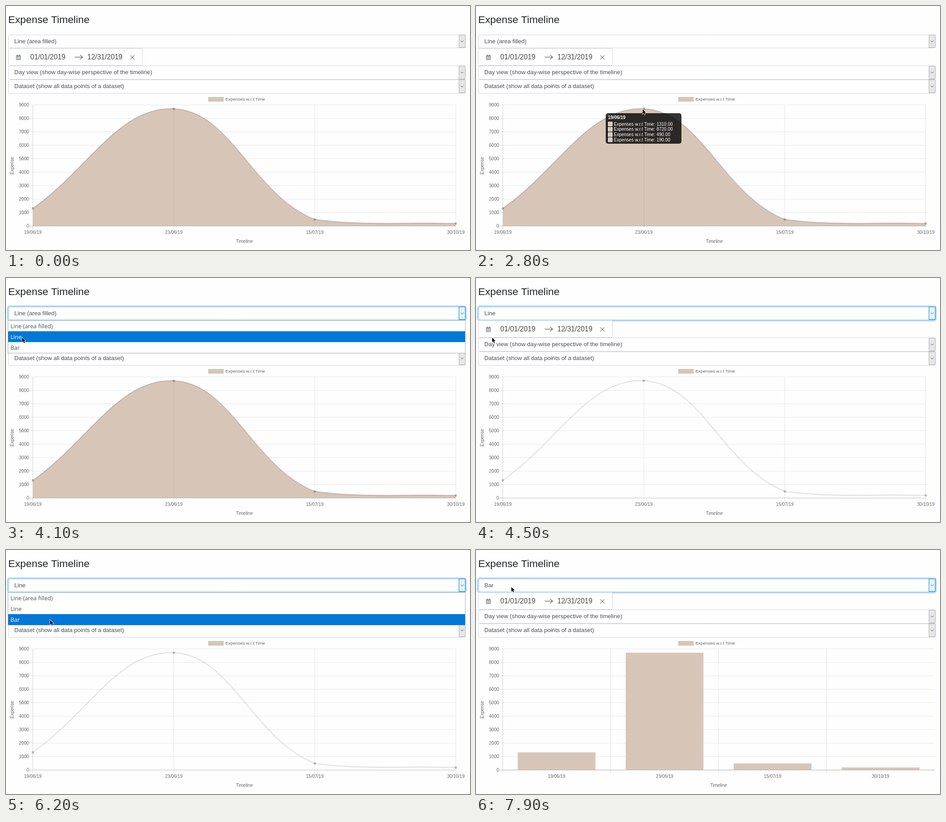
Recreate the animation shown at these times as an HTML page with a canvas. Size 1030x544 px, loop 8 s.

```html
<!DOCTYPE html>
<html lang="en">
<head>
<meta charset="utf-8">
<title>Expense Timeline</title>
<style>
  html, body { margin: 0; width: 100%; height: 100%; overflow: hidden; background: #fefefe; }
  canvas { display: block; width: 1030px; height: 544px; }
</style>
</head>
<body>
<canvas id="stage" width="1030" height="544"></canvas>
<script>
const canvas = document.getElementById('stage');
const ctx = canvas.getContext('2d');
const LOOP = 8000, STEP = 100;
const ARIAL = '"Liberation Sans", Arial, sans-serif';
const MENU_FONT = '12.7px "Open Sans", "Noto Sans", sans-serif';
const SAND = '#d7c6b7';
const BLUE = '#0078d7';

const dates = ['19/06/19', '23/06/19', '15/07/19', '30/10/19'];
const values = [1310, 8720, 490, 190];
const kinds = ['Line (area filled)', 'Line', 'Bar'];
const LEFT = 59, BASE = 490.5, UNIT = 0.03;
const pointX = i => LEFT + 0.5 + i * 313;
const valueY = v => BASE - v * UNIT;

// Pointer path: time, x, y
const path = [
  [300, 46, 0], [400, 104, 14], [600, 104, 14], [800, 82, 50], [1000, 73, 130],
  [1200, 130, 240], [1500, 254, 324], [1600, 330, 290], [1700, 391, 252],
  [1900, 370, 230.5], [2900, 370, 230.5], [3000, 270, 185], [3100, 140, 120],
  [3300, 27, 69.5], [3600, 27, 69.5], [3800, 29, 92], [4100, 36, 133],
  [4500, 36, 133], [4900, 215, 265], [5000, 215, 265], [5300, 133, 97],
  [5400, 113, 89], [5500, 113, 89], [5600, 86.5, 85.5], [5800, 86.5, 85.5],
  [6200, 98, 156], [6500, 98, 156], [6800, 424, 252.5], [7300, 428, 256],
  [7700, 130, 120], [7900, 78.5, 82.5]
];

const clamp = v => Math.max(0, Math.min(1, v));
const outQuart = v => 1 - Math.pow(1 - clamp(v), 4);

function pointerAt(t) {
  if (t < path[0][0]) return null;
  for (let i = 1; i < path.length; i++) {
    const [t0, x0, y0] = path[i - 1], [t1, x1, y1] = path[i];
    if (t <= t1) {
      const k = (t - t0) / (t1 - t0);
      return { x: x0 + (x1 - x0) * k, y: y0 + (y1 - y0) * k };
    }
  }
  const last = path[path.length - 1];
  return { x: last[1], y: last[2] };
}

function text(str, x, y, font, color, align = 'left') {
  ctx.font = font;
  ctx.fillStyle = color;
  ctx.textAlign = align;
  ctx.textBaseline = 'alphabetic';
  ctx.fillText(str, x, y);
}

function line(x0, y0, x1, y1, color, width = 1) {
  ctx.strokeStyle = color;
  ctx.lineWidth = width;
  ctx.beginPath();
  ctx.moveTo(x0, y0);
  ctx.lineTo(x1, y1);
  ctx.stroke();
}

function box(x, y, w, h, fill, stroke, r = 0) {
  ctx.beginPath();
  ctx.roundRect(x, y, w, h, r);
  if (fill) { ctx.fillStyle = fill; ctx.fill(); }
  if (stroke) { ctx.strokeStyle = stroke; ctx.lineWidth = 1; ctx.stroke(); }
}

function select(label, y, h, focus = 0) {
  if (focus) {
    const s = 3 * focus;
    box(5 - s, y - s, 1015 + 2 * s, h + 1 + 2 * s, 'rgba(0,123,255,0.27)', null, 4 + s);
  }
  box(5.5, y + 0.5, 1014, h, '#fff', focus ? '#80bdff' : '#ced4da', 3);
  box(1005.5, y + 0.5, 14, h - 1, focus ? '#e5f1fb' : '#e6e6e6', focus ? BLUE : '#adadad');
  const cy = y + h / 2;
  ctx.strokeStyle = '#444';
  ctx.lineWidth = 1;
  ctx.beginPath();
  ctx.moveTo(1009.5, cy - 1.2);
  ctx.lineTo(1012.5, cy + 1.8);
  ctx.lineTo(1015.5, cy - 1.2);
  ctx.stroke();
  text(label, 18.5, y + 19, '13.05px ' + ARIAL, '#495057');
}

function dateRange() {
  box(5.5, 94.5, 297, 38, '#fff', '#d4d6d8', 1);
  const gray = '#82888a';
  box(22.5, 110.5, 10, 9.5, null, gray, 1);
  ctx.fillStyle = gray;
  ctx.fillRect(22.5, 110.5, 10, 2);
  ctx.fillRect(24.5, 108, 1.5, 3);
  ctx.fillRect(29.5, 108, 1.5, 3);
  for (let i = 1; i < 4; i++) {
    line(22.5 + i * 2.5, 112, 22.5 + i * 2.5, 120, gray, 0.7);
    line(22.5, 112 + i * 2.2, 32.5, 112 + i * 2.2, gray, 0.7);
  }
  const font = '15.6px ' + ARIAL;
  text('01/01/2019', 54, 119, font, '#484848');
  text('12/31/2019', 180.5, 119, font, '#484848');
  line(152.5, 114, 170, 114, '#484848', 1.1);
  line(164.5, 108.8, 170.2, 114.2, '#484848', 1.1);
  line(164.5, 119.2, 170.2, 113.8, '#484848', 1.1);
  line(276, 110, 285, 119, gray, 1.2);
  line(285, 110, 276, 119, gray, 1.2);
}

function menu(active) {
  box(4.5, 94.5, 1015, 73, '#fff', '#a5a9ad');
  kinds.forEach((kind, i) => {
    const y = 94.5 + i * 24.2;
    if (i === active) {
      ctx.fillStyle = BLUE;
      ctx.fillRect(5, y, 1014, 24.2);
    }
    text(kind, 10, y + 17, MENU_FONT, i === active ? '#fff' : '#495057');
  });
}

function axes(bars) {
  const font = '10px ' + ARIAL, ink = '#666';
  const grid = 'rgba(0,0,0,0.09)', zero = 'rgba(0,0,0,0.24)';
  const right = bars ? 1018 : 998.5;
  for (let v = 0; v <= 9000; v += 1000) {
    const y = Math.floor(valueY(v)) + 0.5;
    line(52, y, right, y, v ? grid : zero);
    text(String(v), 51, y + 3.3, font, ink, 'right');
  }
  const gap = bars ? 239.75 : 313;
  for (let i = 0; i < 4; i++) {
    const x = Math.floor(LEFT + i * gap) + 0.5;
    line(x, 220, x, 498, i ? grid : 'rgba(0,0,0,0.16)');
    text(dates[i], bars ? LEFT + (i + 0.5) * gap : x, 507.5, font, ink, 'center');
  }
  text('Timeline', bars ? 538.5 : 529, 528, font, ink, 'center');
  ctx.save();
  ctx.translate(17, 356);
  ctx.rotate(-Math.PI / 2);
  text('Expense', 0, 0, font, ink, 'center');
  ctx.restore();
  box(449, 203, 34, 10, SAND);
  box(449.5, 203.5, 33, 9, null, 'rgba(0,0,0,0.06)');
  text('Expenses w.r.t Time', 487, 210.8, '9.9px ' + ARIAL, ink);
}

// Smooth curve with tension 0.4, control points kept above the base line
function tracePath() {
  const pts = values.map((v, i) => ({ x: pointX(i), y: valueY(v) }));
  const ctrl = pts.map((p, i) => {
    const a = pts[i - 1] || p, b = pts[i + 1] || p;
    const da = Math.hypot(p.x - a.x, p.y - a.y), db = Math.hypot(b.x - p.x, b.y - p.y);
    const shift = k => ({
      x: p.x + k * (b.x - a.x),
      y: Math.max(220, Math.min(BASE, p.y + k * (b.y - a.y)))
    });
    return [shift(-0.4 * da / (da + db)), shift(0.4 * db / (da + db))];
  });
  ctx.moveTo(pts[0].x, pts[0].y);
  for (let i = 1; i < 4; i++) {
    const c = ctrl[i - 1][1], d = ctrl[i][0];
    ctx.bezierCurveTo(c.x, c.y, d.x, d.y, pts[i].x, pts[i].y);
  }
}

function curve(filled) {
  if (filled) {
    ctx.beginPath();
    tracePath();
    ctx.lineTo(pointX(3), BASE);
    ctx.lineTo(pointX(0), BASE);
    ctx.closePath();
    ctx.fillStyle = SAND;
    ctx.fill();
    line(372.5, 229, 372.5, 490, 'rgba(0,0,0,0.08)');
    line(LEFT, BASE, 998, BASE, 'rgba(0,0,0,0.12)');
  }
  ctx.beginPath();
  tracePath();
  ctx.strokeStyle = filled ? 'rgba(0,0,0,0.14)' : 'rgba(0,0,0,0.1)';
  ctx.lineWidth = 2.5;
  ctx.stroke();
  values.forEach((v, i) => {
    ctx.beginPath();
    ctx.arc(pointX(i), valueY(v), 2.5, 0, 7);
    ctx.fillStyle = 'rgba(0,0,0,0.2)';
    ctx.fill();
    ctx.strokeStyle = 'rgba(0,0,0,0.12)';
    ctx.lineWidth = 1;
    ctx.stroke();
  });
}

function bars(grow) {
  ctx.fillStyle = SAND;
  values.forEach((v, i) => {
    const h = v * UNIT * grow;
    ctx.fillRect(LEFT + (i + 0.5) * 239.75 - 86.3, BASE - h, 172.6, h);
  });
  line(LEFT, BASE, 1018, BASE, 'rgba(0,0,0,0.12)');
}

function tooltip(alpha) {
  if (alpha <= 0.01) return;
  ctx.save();
  ctx.globalAlpha = alpha;
  box(288, 239, 168, 68, 'rgba(0,0,0,0.8)', null, 5);
  ctx.beginPath();
  ctx.moveTo(372, 234.5);
  ctx.lineTo(376.5, 239);
  ctx.lineTo(367.5, 239);
  ctx.fill();
  text(dates[0], 293, 252, 'bold 10px ' + ARIAL, '#fff');
  values.forEach((v, i) => {
    const y = 258 + i * 11.8;
    box(293.5, y + 0.5, 9, 9, SAND, '#fff');
    text('Expenses w.r.t Time: ' + v.toFixed(2), 306, y + 8.5, '10px ' + ARIAL, '#fff');
  });
  ctx.restore();
}

function pointer(p) {
  ctx.save();
  ctx.translate(p.x, p.y);
  ctx.beginPath();
  [[0, 0], [0, 10.2], [2.3, 8.1], [4, 12], [5.7, 11.2], [4.1, 7.5], [7.2, 7.2]]
    .forEach(([x, y]) => ctx.lineTo(x, y));
  ctx.closePath();
  ctx.strokeStyle = '#fff';
  ctx.lineWidth = 1.4;
  ctx.stroke();
  ctx.fillStyle = '#000';
  ctx.fill();
  ctx.restore();
}

function draw(t) {
  const kind = t < 4500 ? 0 : t < 6500 ? 1 : 2;
  const open = (t >= 3500 && t < 4500) || (t >= 5600 && t < 6500);
  const p = pointerAt(t);

  ctx.fillStyle = '#fefefe';
  ctx.fillRect(0, 0, 1030, 544);
  text('Expense Timeline', 5, 38, '22.8px ' + ARIAL, '#212529');
  select(kinds[kind], 64, 29, clamp((t - 3450) / 400));
  dateRange();
  select('Day view (show day-wise perspective of the timeline)', 133, 30);
  select('Dataset (show all data points of a dataset)', 164, 30);

  axes(kind === 2);
  if (kind === 2) bars(outQuart((t - 6516) / 1000));
  else curve(kind === 0);

  if (t >= 2100 && t < 3300) {
    tooltip(t < 3000 ? outQuart((t - 2050) / 400) : 1 - outQuart((t - 2950) / 400));
  }
  if (open) {
    const row = Math.floor((p.y - 94.5) / 24.2);
    menu(row >= 0 && row < 3 ? row : kind);
  }
  if (p) pointer(p);
}

const start = performance.now();
function tick() {
  const t = (performance.now() - start) % LOOP;
  draw(Math.floor(t / STEP) * STEP);
  requestAnimationFrame(tick);
}
tick();
</script>
</body>
</html>
```
